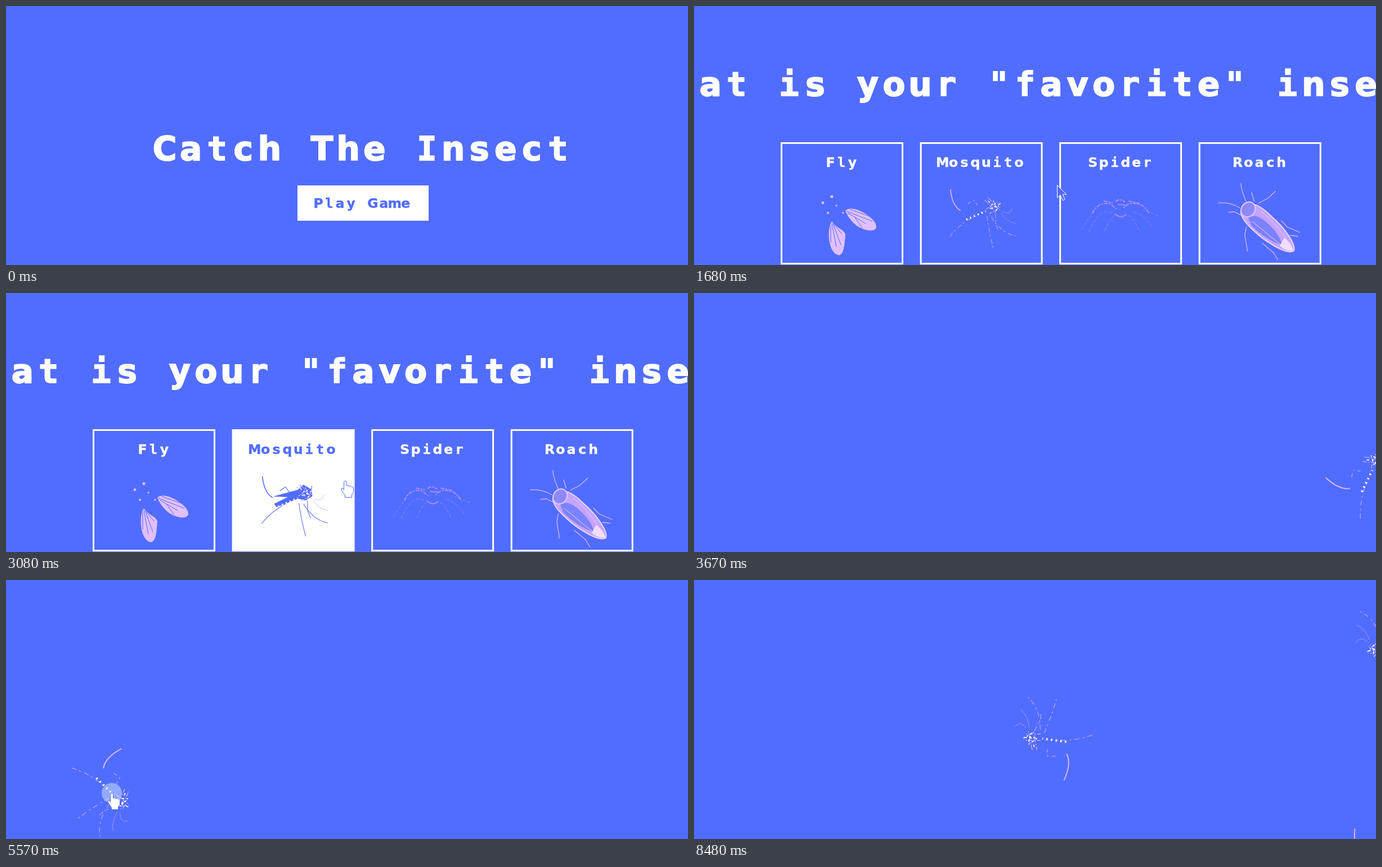
Write an HTML page that moves like this. It is 1212 px wide and 462 px high and loops after 8790 ms.

```html
<!DOCTYPE html>
<html lang="en">
<head>
<meta charset="utf-8">
<title>Catch The Insect</title>
<style>
  html, body { margin: 0; width: 100%; height: 100%; overflow: hidden; background: #516dff; }
  svg { display: block; width: 1212px; height: 462px; --leg: #dcb8ff; --blue: #516dff; --dash: 8 4 3 6; --faint: .75; }
  text { font: bold 58px "DejaVu Sans", sans-serif; text-anchor: middle; fill: #fff; stroke: #fff; stroke-width: 2; }
  .slab { font-family: "DejaVu Sans Mono", monospace; }
  .small { font-size: 23.5px; stroke-width: .4; }
  .card rect { fill: var(--blue); stroke: #fff; stroke-width: 3; }
  .card.on { --leg: #516dff; --dash: none; --faint: 1; }
  .card.on rect { fill: #fff; }
  .card.on text, #play text { fill: var(--blue); stroke: var(--blue); }
  .line { fill: none; stroke: var(--leg); }
  .broken { stroke-dasharray: var(--dash); opacity: var(--faint); }
  .dark { fill: var(--blue); }
</style>
</head>
<body>
<svg id="stage" viewBox="0 0 1212 462">
  <defs>
    <g id="mosquito">
      <g class="line">
        <path stroke-width="1.7" d="M-55 -53Q-52 -24 -37 -15"/>
        <g class="broken" stroke-width="1.1">
          <path d="M-56 31Q-38 8 -10 -6M10 -5Q14 25 22 54M18 -4Q35 25 61 30"/>
          <path d="M25 -10L26 10L31 22M-5 -22L-14 -34L-24 -27M20 -26L12 -38M30 -16L33 -36"/>
        </g>
        <path stroke-width=".7" opacity=".6" d="M35 -10Q45 5 61 8M38 -13Q52 -6 55 -20"/>
      </g>
      <path class="dark" d="M-36 -17L8 -29L18 -38L32 -30L34 -18L22 -10L8 -13L-30 2L-34 -4L-10 -16Z"/>
      <g fill="none">
        <path d="M-27 1L8 -14" stroke="#fff" stroke-width="3.4" stroke-dasharray="2.4 5"/>
        <path d="M6 -34L26 -12M14 -36L33 -16M9 -18L31 -31M14 -9L35 -22" stroke="#d2acff" stroke-width="1.2" stroke-dasharray="6 2 2 3"/>
        <path d="M12 -32L28 -19L22 -33L15 -17L33 -27L24 -11" stroke="#fff" stroke-width="1.6" stroke-dasharray="4 4 2 4"/>
      </g>
    </g>

    <g id="fly">
      <g class="dark">
        <ellipse cx="-12" cy="-16" rx="15" ry="21" transform="rotate(-30 -12 -16)"/>
        <circle cx="-26" cy="-34" r="11"/>
      </g>
      <g fill="#e0bfff">
        <path d="M6 -15C18 -28 60 -3 61 13C61 25 38 21 25 11C18 5 10 -4 6 -15Z"/>
        <path d="M-18 4C-28 20 -24 58 -8 64C4 68 5 42 6 27C3 18 -12 15 -18 4Z"/>
        <circle cx="-18" cy="-40" r="2.6"/><circle cx="-34" cy="-29" r="2.4"/>
        <circle cx="-25" cy="-11" r="2"/><circle cx="2" cy="-11" r="1.8"/><circle cx="-10" cy="-24" r="1.6"/>
      </g>
      <path d="M8 -14L54 4M10 -11L42 8M14 -17L52 -4M22 -4L36 16M-18 8L-10 50M-16 8L-2 46M-20 12L-20 42M-14 10L0 27" fill="none" stroke="#516dff" stroke-width="1"/>
    </g>

    <g id="spider" fill="none" stroke="#aa8cf8">
      <path stroke-width="2.2" stroke-dasharray="7 2 3 2" d="M-50 -10Q-42 -31 -18 -27L-8 -18M-30 -32L-14 -29M50 -11Q38 -32 14 -27L4 -19M14 -32L34 -28M-9 -31Q-2 -38 8 -30"/>
      <path stroke-width="1" opacity=".7" stroke-dasharray="6 3" d="M-70 19L-61 5L-51 -9M-56 23Q-42 -14 -22 -13L-8 -8M67 -6L54 -11L40 -17M56 14Q36 -14 20 -12M-28 21Q-20 0 -9 -8M32 20Q24 -2 8 -10"/>
      <path stroke-width="2" d="M-10 -9Q0 0 10 -8M-5 -26L9 -25"/>
    </g>

    <g id="roach">
      <g fill="none" stroke="#d6b5ff" stroke-width="1.3">
        <path d="M-23 -28Q-33 -48 -34 -64M-36 -20Q-52 -30 -74 -29M-3 -28L14 -37L28 -50M-10 -31L-15 -47M-34 -7L-46 -13L-56 -12M-24 13L-27 28L-22 58M38 3L48 14L71 24M54 29L68 31M4 43L24 60L32 73"/>
      </g>
      <path d="M-34 -14C-24 -34 -4 -30 20 -5C45 16 65 47 60 57C49 64 10 43 -18 14C-27 5 -34 -4 -34 -14Z" fill="#c4a4ff" stroke="#ecd4ff" stroke-width="2"/>
      <path d="M-21 -3C-4 -12 10 4 24 18C32 28 38 38 39 46C24 43 1 28 -15 12Z" fill="#7b82ff"/>
      <path d="M2 -14C24 4 42 25 56 53M-14 4L38 47" fill="none" stroke="#ead0ff"/>
      <path d="M43 34Q56 42 59 56Q49 59 35 48Z" fill="#f3ddff"/>
      <ellipse cx="-21" cy="-17" rx="12" ry="14" fill="#8e89ff" stroke="#e4c9ff" stroke-width="2" transform="rotate(35 -21 -17)"/>
    </g>
  </defs>

  <g id="intro">
    <g id="play"><rect x="518" y="320" width="233" height="63" fill="#fff"/></g>
  </g>
  <g id="choose"></g>
  <g id="game"></g>
  <g id="cursor">
    <path id="arrow" d="M.5 .5V23L6 18L10 27Q12 29 14 26L10.5 17H17Z" fill="#516dff" stroke="#fff"/>
    <path id="hand" d="M-2.5 2Q0 -2 2.5 2V9Q5 7 7 10Q10 8 11.5 11Q15 10 14.5 14V20L11.5 25V29.5H-.5V26L-6.5 17Q-8 13 -5 13L-2.5 16Z" fill="#fff" stroke="#516dff"/>
  </g>
</svg>
<script>
const LOOP = 8790, PAGE = 920, FIRST_CLICK = 1153, SECOND_CLICK = 3120;
const $ = id => document.getElementById(id);

function add(parent, name, attrs = {}) {
  const node = document.createElementNS('http://www.w3.org/2000/svg', name);
  for (const key in attrs) node.setAttribute(key, attrs[key]);
  return parent.appendChild(node);
}

// Centres each character in a cell of equal width.
function addText(parent, string, x, y, cell, className = '') {
  const text = add(parent, 'text', { y, class: className });
  [...string].forEach((char, i) => {
    if (char === ' ') return;
    const span = add(text, 'tspan', { x: x + i * cell });
    if (/[Iilrtf]/.test(char)) span.setAttribute('class', 'slab');
    span.textContent = char;
  });
}

addText($('intro'), 'Catch The Insect', 282, 274.5, 46.6);
addText($('play'), 'Play Game', 555, 359.5, 19.4, 'small');
addText($('choose'), 'What is your "favorite" insect?', -64, 159.5, 46.6);

const cards = ['Fly', 'Mosquito', 'Spider', 'Roach'].map((name, i) => {
  const x = 154 + i * 247.6;
  const node = add($('choose'), 'g', { class: 'card' });
  add(node, 'rect', { x: x + 1.5, y: 244.5, width: 215, height: 215 });
  addText(node, name, x + 108 - (name.length - 1) * 9.7, 287, 19.4, 'small');
  add(node, 'use', { href: '#' + name.toLowerCase(), x: x + 109, y: 380 });
  return { node, x };
});

const insects = [
  { x: 1209, y: 334, turn: -41, born: 3670, caught: 3840 },
  { x: 173, y: 381, turn: 68, born: 4650, caught: 5660 },
  { x: 125, y: 180, turn: 250, born: 6500, caught: 6980 },
  { x: 1242, y: 107, turn: 195, born: 6600, caught: LOOP },
  { x: 1225, y: 513, turn: 10, born: 7100, caught: LOOP },
  { x: 635, y: 274, turn: 211, born: 8480, caught: LOOP }
];
for (const insect of insects) insect.node = add($('game'), 'use', { href: '#mosquito' });
const ring = add($('game'), 'circle', { r: 18, fill: '#d9ecff', opacity: .48 });

// Time, x, y
const pointerPath = [
  [670, 735, 466], [1080, 679, 362], [1390, 679, 362], [1680, 645, 319],
  [2240, 300, 350], [2280, 300, 350], [2600, 585, 345], [2840, 585, 345],
  [3060, 603, 335], [3120, 603, 335], [3450, 1230, 330], [3870, 1230, 330],
  [4630, 780, 262], [4710, 780, 262], [5300, 210, 400], [5540, 188, 380],
  [5670, 188, 380], [6300, 640, 330], [6560, 640, 330], [6940, 130, 180],
  [7000, 130, 180], [7400, 590, 345], [7440, 590, 345], [7690, 530, 362],
  [7830, 530, 362], [7960, 452, 320], [8310, 1112, 475]
];

const clamp = v => Math.max(0, Math.min(1, v));
const smooth = v => v * v * (3 - 2 * v);

// cubic-bezier(0, 0, .58, 1)
function easeOut(v) {
  let low = 0, high = 1;
  for (let i = 0; i < 22; i++) {
    const s = (low + high) / 2;
    if (1.74 * s * s - .74 * s ** 3 < v) low = s; else high = s;
  }
  return smooth(high);
}

function pointerAt(t) {
  const next = pointerPath.findIndex(p => p[0] > t);
  if (next === 0) return pointerPath[0].slice(1);
  if (next < 0) return pointerPath[pointerPath.length - 1].slice(1);
  const [t0, x0, y0] = pointerPath[next - 1], [t1, x1, y1] = pointerPath[next];
  const k = smooth((t - t0) / (t1 - t0));
  return [x0 + (x1 - x0) * k, y0 + (y1 - y0) * k];
}

const place = (node, x, y, rest = '') => node.setAttribute('transform', `translate(${x} ${y}) ${rest}`);
const show = (node, on) => node.setAttribute('visibility', on ? 'visible' : 'hidden');

function draw(t) {
  const [x, y] = pointerAt(t);
  const first = easeOut(clamp((t - FIRST_CLICK) / 500));
  const second = easeOut(clamp((t - SECOND_CLICK) / 500));
  const chooseY = PAGE * (1 - first - second);
  place($('intro'), 0, -PAGE * first);
  place($('choose'), 0, chooseY);

  const onButton = x > 518 && x < 751 && y > 320 && y < 383;
  $('play').setAttribute('opacity', onButton && t < 1300 ? .9 : 1);
  let hand = onButton && t < FIRST_CLICK;

  for (const card of cards) {
    const top = 243 + chooseY;
    const on = x > card.x && x < card.x + 218 && y > top && y < top + 218;
    card.node.setAttribute('class', on ? 'card on' : 'card');
    hand = hand || on;
  }

  for (const insect of insects) {
    const size = 1.13 * (1 - smooth(clamp((t - insect.caught) / 300)));
    const alive = t >= insect.born && size > 0;
    show(insect.node, alive);
    place(insect.node, insect.x, insect.y, `rotate(${insect.turn}) scale(${size})`);
    hand = hand || alive && Math.hypot(x - insect.x, y - insect.y) < 55 * size;
  }

  show(ring, t >= 5550 && t < 5680 || t >= 6950 && t < 7010);
  place(ring, x, y);
  place($('cursor'), x, y);
  show($('hand'), hand);
  show($('arrow'), !hand);
}

const start = performance.now();
function tick() {
  draw((performance.now() - start) % LOOP);
  requestAnimationFrame(tick);
}
tick();
</script>
</body>
</html>
```
